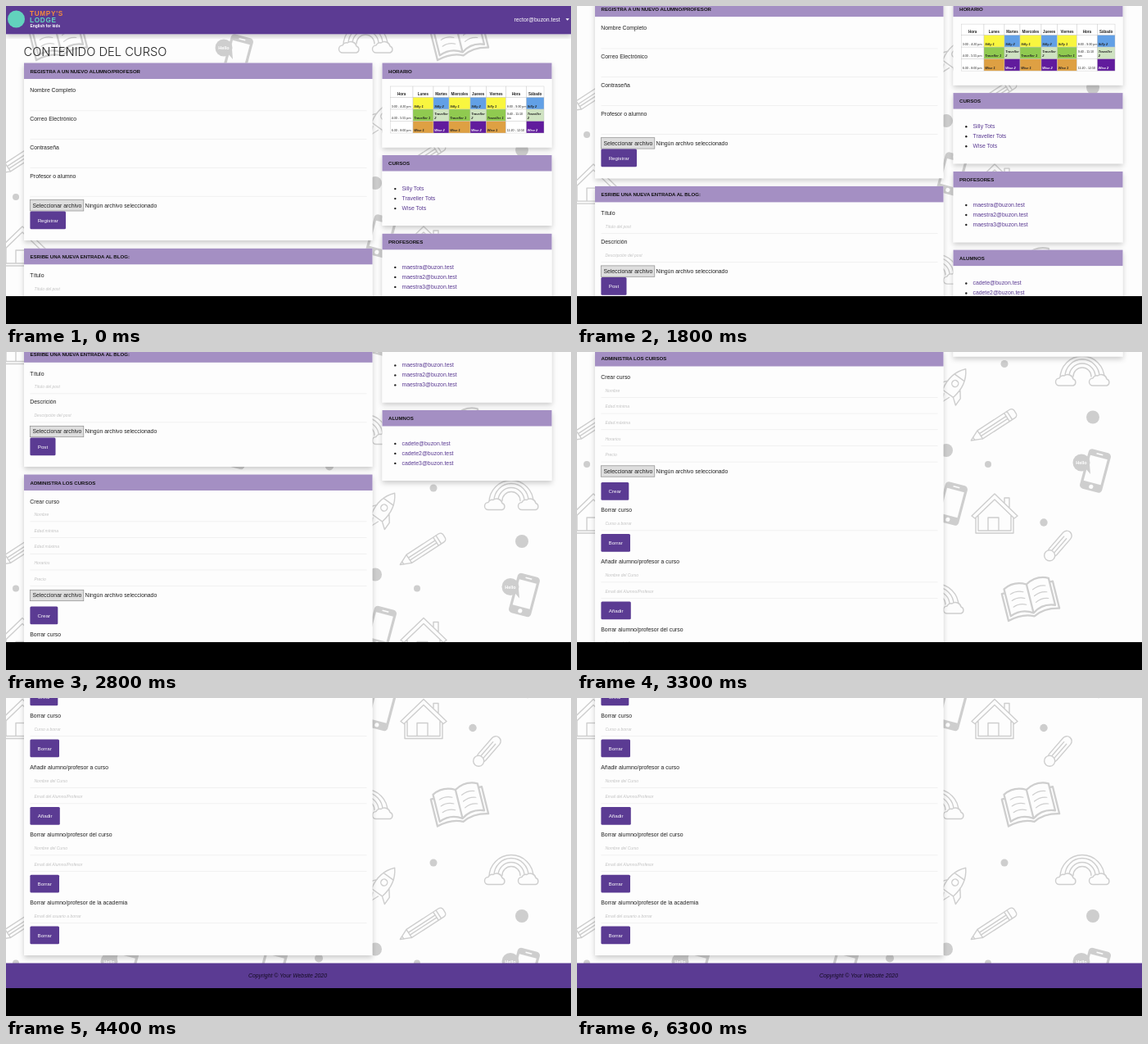
An HTML page that plays this animation: 690 px wide and 388 px high, repeating every 6500 ms.

```html
<!DOCTYPE html>
<html lang="es">
<head>
<meta charset="utf-8">
<title>Contenido del curso</title>
<style>
html, body { margin: 0; width: 100%; height: 100%; overflow: hidden; background: #000; }
svg { display: block; width: 100vw; height: 100vh; }
text { font-family: "Liberation Sans", Arial, sans-serif; font-size: 6.86px; fill: #222; white-space: pre; }
.title { font-family: Inter, sans-serif; font-weight: 300; font-size: 14.7px; fill: #222; }
.head { font-weight: bold; font-size: 6.08px; fill: #111; }
.link { fill: #5b3b93; }
.white { fill: #fff; }
.btn { fill: #fff; font-size: 6.2px; text-anchor: middle; }
.hint { fill: #c2c2c2; font-size: 5px; font-style: italic; }
.foot { fill: #140c22; font-style: italic; text-anchor: middle; }
.th { font-weight: bold; font-size: 4.5px; text-anchor: middle; }
.td { font-size: 4px; font-weight: bold; font-style: italic; }
.hr { font-size: 3.7px; }
.brand { font-weight: bold; font-size: 8.2px; letter-spacing: .7px; }
.tag { font-weight: bold; font-size: 4.9px; fill: #fff; }
.doodle { fill: none; stroke: #cecece; stroke-width: 1.4; stroke-linejoin: round; stroke-linecap: round; }
.solid { fill: #cecece; stroke: none; }
.paper { fill: #fdfdfd; }
.hello { stroke: none; fill: #fff; font-size: 5.5px; font-weight: bold; text-anchor: middle; }
</style>
</head>
<body>
<svg id="stage" viewBox="0 0 690 388" preserveAspectRatio="none">
  <defs>
    <filter id="shade" x="-5%" y="-10%" width="110%" height="125%">
      <feDropShadow dx="0" dy="3" stdDeviation="3" flood-color="#000" flood-opacity=".2"/>
    </filter>
    <clipPath id="view"><rect width="690" height="354"/></clipPath>
    <g id="rainbow">
      <path d="M-27 8a27 27 0 0 1 54 0M-21 6a21 21 0 0 1 42 0M-16 6a16 16 0 0 1 32 0M-11 6a11 11 0 0 1 22 0"/>
      <path id="cloud" class="paper" d="M-28 17a4.5 4.5 0 0 1 0-9a5 5 0 0 1 6-3a7 7 0 0 1 11 4a4.2 4.2 0 0 1 0 8z"/>
      <use href="#cloud" x="41"/>
    </g>
    <g id="phone" transform="rotate(15)">
      <rect class="solid" x="-14" y="-25" width="28" height="50" rx="4.5"/>
      <rect class="paper" x="-10.8" y="-17" width="21.6" height="32" stroke="none"/>
      <path class="paper" stroke="none" d="M-4-21.8h8v1.6h-8z"/>
      <circle class="paper" cy="20" r="2.6" stroke="none"/>
    </g>
    <g id="chat">
      <use href="#phone"/>
      <circle class="solid" cx="-17" cy="-10" r="10.5"/>
      <path class="solid" d="M-12-3l6 7-1-12z"/>
      <text class="hello" x="-17" y="-8">Hello</text>
    </g>
    <g id="house">
      <path d="M-28 2L0-25 28 2 24 5 0-18-24 5zM-23 4V23H23V4M-20 2V20H20V2M-8 20V4H5V20M12-14V-20H18V-8"/>
    </g>
    <g id="pencil" transform="rotate(-33)">
      <path d="M-33 0L-20-6H27a4 4 0 0 1 4 4V2a4 4 0 0 1-4 4H-20zM-20-6V6M19-6V6M23-6V6M-20-1.5H19M-20 2H19M-29-2V2"/>
    </g>
    <g id="rocket" transform="rotate(36)">
      <path d="M0-25Q13-10 8 12H-8Q-13-10 0-25zM-7-12H7M9-1l7 9v10l-8-6M-9-1l-7 9v10l8-6M-4 15L0 25 4 15"/><circle cy="-3" r="4"/>
    </g>
    <g id="pin" transform="rotate(41)">
      <rect x="-6" y="-23" width="12" height="38" rx="6"/><path d="M-2-14V8M2-14V8"/><circle class="paper" cy="15" r="6.5"/>
    </g>
    <g id="book" transform="rotate(-14)" stroke-width="2.3">
      <path d="M0-17Q-14-25-28-18V16Q-13 10 0 19Q13 10 28 16V-18Q14-25 0-17V18M-28-13H-32V21Q-14 16 0 23Q14 16 32 21V-13H28"/>
      <path stroke-width="1.2" d="M-22-10q8-3 16 1M-22-2q8-3 16 1M-22 6q8-3 16 1M6-9q8-4 16-1M6-1q8-4 16-1M6 7q8-4 16-1"/>
    </g>
  </defs>
  <g clip-path="url(#view)"><g id="page"></g></g>
</svg>
<script>
const page = document.getElementById('page');
const PURPLE = '#5b3b93', LILAC = '#a48fc3';

function add(tag, attrs, parent = page, content) {
  const el = document.createElementNS('http://www.w3.org/2000/svg', tag);
  for (const k in attrs) el.setAttribute(k, attrs[k]);
  if (content) el.textContent = content;
  return parent.appendChild(el);
}
const rect = (x, y, width, height, fill, more) => add('rect', { x, y, width, height, fill, ...more });
// y is the middle of the line
const text = (s, x, y, cls = '') => add('text', { x, y: y + 2.4, class: cls }, page, s);

function card(title, x, w, top, bottom) {
  rect(x, top, w, bottom - top, '#fdfdfd', { filter: 'url(#shade)' });
  rect(x, top, w, 19.5, LILAC);
  text(title, x + 7.5, top + 9.6, 'head');
}
const main = (title, top, bottom) => card(title, 22, 425.5, top, bottom);
const side = (title, top, bottom) => card(title, 459.5, 207, top, bottom);

function field(hint, y) {
  rect(29.5, y + 8, 411, .7, '#ececec');
  if (hint) text(hint, 34.5, y - .9, 'hint');
}
function file(y) {
  rect(29.3, y - 6.7, 65.5, 13.4, '#dedede', { stroke: '#8c8c8c', 'stroke-width': .7 });
  text('Seleccionar archivo', 32.4, y);
  text('Ningún archivo seleccionado', 96.5, y);
}
function button(label, top, w) {
  rect(29.4, top, w - .4, 21.7, PURPLE, { rx: 1.5 });
  text(label, 29.2 + w / 2, top + 10.7, 'btn');
}
function list(items, y) {
  items.forEach((s, i) => {
    add('circle', { cx: 475.3, cy: y + i * 12 + .4, r: 1.2, fill: '#222' });
    text(s, 483.5, y + i * 12, 'link');
  });
}

function doodles() {
  const g = add('g', { class: 'doodle' });
  const shapes = [
    ['rainbow', 617, 478], ['rainbow', 439, 756], ['chat', 633, 599], ['chat', 283, 777],
    ['phone', 458, 639], ['phone', 325, 599], ['house', 510, 652], ['pencil', 509, 544],
    ['rocket', 460, 495], ['pin', 587, 691], ['book', 553, 754]
  ];
  const dots = [[522, 468.5, 4.5], [630, 533.5, 8], [502, 591, 4], [570, 662, 4.7], [451, 574, 8], [395, 442, 5], [382, 585, 5]];
  for (const dx of [-490, 0, 490]) for (let dy = -716; dy <= 358; dy += 358) {
    for (const [id, x, y] of shapes) add('use', { href: '#' + id, x: x + dx, y: y + dy }, g);
    for (const [x, y, r] of dots) add('circle', { cx: x + dx, cy: y + dy, r, class: 'solid' }, g);
  }
}

function timetable() {
  const xs = [469.5, 497, 522, 541, 567, 586.5, 610.5, 635.5, 657];
  const ys = [98, 111.5, 126, 140.5, 155];
  const days = ['Hora', 'Lunes', 'Martes', 'Miercoles', 'Jueves', 'Viernes', 'Hora', 'Sábado'];
  const rows = [
    ['Silly', '#f9f63f', '#62a0e6', ['3:00 - 4:20 pm'], ['8:00 - 9:30 pm']],
    ['Traveller', '#90ca50', '#cfe3c2', ['4:30 - 5:55 pm'], ['9:40 - 11:10', 'am']],
    ['Wise', '#dea043', '#611b9d', ['6:30 - 8:00 pm'], ['11:20 - 12:50']]
  ];
  const line = { stroke: '#c4c4c4', 'stroke-width': .4 };
  days.forEach((day, c) => {
    const x = xs[c], w = xs[c + 1] - x;
    rect(x, ys[0], w, 13.5, '#fff', line);
    text(day, x + w / 2, 107, 'th');
    rows.forEach(([name, a, b, early, late], r) => {
      const hour = c === 0 || c === 6, odd = c % 2 === 1 && c < 7;
      rect(x, ys[r + 1], w, 14.5, hour ? '#fff' : odd ? a : b, line);
      const n = odd ? 1 : 2;
      const words = hour ? (c ? late : early) : r === 1 && !odd ? [name, n] : [name + ' ' + n];
      words.forEach((s, i) => {
        const el = text(String(s), x + 1.2, ys[r + 2] - 4.9 - (words.length - 1 - i) * 5, hour ? 'hr' : 'td');
        if (r === 2 && !odd && !hour) el.style.fill = '#fff';
      });
    });
  });
  // Wednesday and Friday share the colours of Monday; Saturday those of Tuesday
}

rect(0, 0, 690, 980, '#fdfdfd');
doodles();

rect(0, 0, 690, 34.3, PURPLE, { filter: 'url(#shade)' });
add('circle', { cx: 12.5, cy: 16, r: 10.5, fill: '#62d2bd' });
text("TUMPY'S", 29, 9.5, 'brand').style.fill = '#f58a3c';
text('LODGE', 29, 17.2, 'brand').style.fill = '#62d2bd';
text('English for kids', 29.5, 24, 'tag');
text('rector@buzon.test', 620.5, 16.3, 'white');
add('path', { d: 'M683.5 15.2h4.4l-2.2 2.5z', fill: '#fff' });
text('CONTENIDO DEL CURSO', 21.5, 58.5, 'title');

main('REGISTRA A UN NUEVO ALUMNO/PROFESOR', 69.5, 286);
['Nombre Completo', 'Correo Electrónico', 'Contraseña', 'Profesor o alumno'].forEach((s, i) => {
  text(s, 29.3, 103 + i * 34.8);
  field('', 119.5 + i * 34.8);
});
file(243.3);
button('Registrar', 250.5, 44);

main('ESRIBE UNA NUEVA ENTRADA AL BLOG:', 295.8, 442.5);
text('Título', 29.3, 328.7);
field('Título del post', 345);
text('Descrición', 29.3, 363.5);
field('Descripción del post', 380);
file(399.5);
button('Post', 407, 31.5);

main('ADMINISTRA LOS CURSOS', 452, 939.5);
text('Crear curso', 29.3, 485);
['Nombre', 'Edad mínima', 'Edad máxima', 'Horarios', 'Precio'].forEach((s, i) => field(s, 501 + i * 19.7));
file(599.5);
button('Crear', 613, 34.3);
text('Borrar curso', 29.3, 647);
field('Curso a borrar', 663.5);
button('Borrar', 676, 36);
text('Añadir alumno/profesor a curso', 29.3, 709.8);
field('Nombre del Curso', 726.5);
field('Email del Alumno/Profesor', 746);
button('Añadir', 758.5, 36.8);
text('Borrar alumno/profesor del curso', 29.3, 792.5);
field('Nombre del Curso', 809);
field('Email del Alumno/Profesor', 828.7);
button('Borrar', 841.3, 36);
text('Borrar alumno/profesor de la academia', 29.3, 875.3);
field('Email del usuario a borrar', 891.8);
button('Borrar', 904, 36);

side('HORARIO', 69.5, 172.5);
timetable();
side('CURSOS', 182, 268);
list(['Silly Tots', 'Traveller Tots', 'Wise Tots'], 222.7);
side('PROFESORES', 277.8, 364);
list(['maestra@buzon.test', 'maestra2@buzon.test', 'maestra3@buzon.test'], 318.5);
side('ALUMNOS', 373.5, 459.5);
list(['cadete@buzon.test', 'cadete2@buzon.test', 'cadete3@buzon.test'], 414);

rect(0, 949, 690, 31, PURPLE);
text('Copyright © Your Website 2020', 344, 964.5, 'foot');

// time in ms, scroll offset in px
const keys = [[1400, 0], [1500, 5], [2200, 188.5], [2800, 302.5], [3300, 454], [3900, 625.5]];
const last = keys.length - 1;
function slope(i) {
  if (i === 0 || i === last) return 0;
  const rate = j => (keys[j + 1][1] - keys[j][1]) / (keys[j + 1][0] - keys[j][0]);
  return (rate(i - 1) + rate(i)) / 2;
}
function scrollAt(t) {
  if (t <= keys[0][0]) return 0;
  if (t >= keys[last][0]) return keys[last][1];
  const i = keys.findIndex(k => k[0] > t) - 1;
  const [t0, a] = keys[i], [t1, b] = keys[i + 1];
  const d = t1 - t0, u = (t - t0) / d, v = 1 - u;
  return v * v * (1 + 2 * u) * a + u * u * (3 - 2 * u) * b + d * u * v * (v * slope(i) - u * slope(i + 1));
}

const LOOP = 6500, STEP = 100;
function draw(now) {
  const t = Math.floor((now % LOOP) / STEP) * STEP;
  page.setAttribute('transform', `translate(0 ${-scrollAt(t)})`);
}
let start;
function tick(now) {
  start ??= now;
  draw(now - start);
  requestAnimationFrame(tick);
}
draw(0);
requestAnimationFrame(tick);
</script>
</body>
</html>
```
